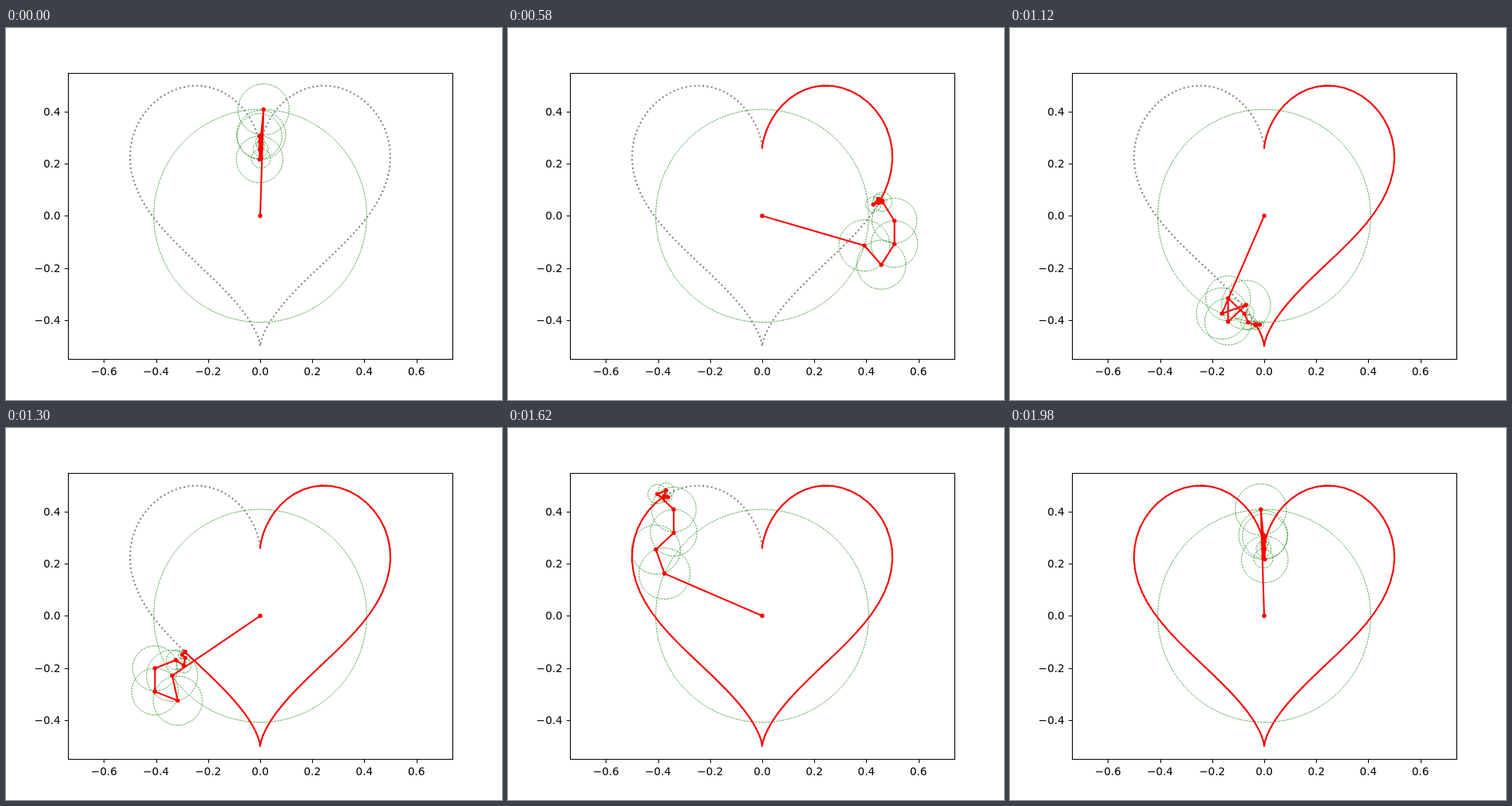
These frames come from a looping animation (640 px wide and 480 px high, 2000 ms). An HTML page:

```html
<!DOCTYPE html>
<html lang="en">
<head>
<meta charset="utf-8">
<title>Heart drawn by epicycles</title>
<style>
  html, body { margin: 0; width: 100%; height: 100%; overflow: hidden; background: #fff; }
  svg { display: block; }
  path { fill: none; }
  text { font: 13.889px "DejaVu Sans", sans-serif; fill: #000; }
  #outline { stroke: #808080; stroke-width: 2.083; stroke-dasharray: 2.083 3.438; stroke-linejoin: round; }
  #circles { stroke: #008000; stroke-width: .694; stroke-dasharray: 2.569 1.111; }
  #trace, #arms { stroke: #f00; stroke-width: 2.083; stroke-linejoin: round; stroke-linecap: square; }
  #joints { stroke: #f00; stroke-width: 5.56; stroke-linecap: round; }
  #axes { stroke: #000; stroke-width: 1.111; }
</style>
</head>
<body>
<svg width="640" height="480" viewBox="0 0 640 480">
  <path id="circles"/>
  <path id="outline"/>
  <path id="trace"/>
  <path id="arms"/>
  <path id="joints"/>
  <path id="axes"/>
  <g id="labels"></g>
</svg>
<script>
const COUNT = 100, STEP = 20, TAU = 2 * Math.PI;
const SCALE = 336, CX = 328, CY = 242.4;
const el = id => document.getElementById(id);
const setPath = (id, d) => el(id).setAttribute('d', d);
const px = x => CX + SCALE * x;
const py = y => CY - SCALE * y;
const at = ([x, y]) => px(x).toFixed(2) + ' ' + py(y).toFixed(2);
const polyline = points => 'M' + points.map(at).join('L');

// Scale values to the range -0.5 to 0.5
function fit(values) {
  const low = Math.min(...values), high = Math.max(...values);
  return values.map(v => (v - low) / (high - low) - 0.5);
}

// Heart samples; the last one repeats the first
const angles = Array.from({ length: COUNT }, (_, i) => TAU * i / (COUNT - 1));
const xs = fit(angles.map(t => Math.sin(t) ** 3));
const ys = fit(angles.map(t =>
  13 * Math.cos(t) - 5 * Math.cos(2 * t) - 2 * Math.cos(3 * t) - Math.cos(4 * t)));
const heart = xs.map((x, i) => [x, ys[i]]);

// Fourier terms, largest radius first
const terms = heart.map((_, i) => {
  const freq = i - COUNT / 2;
  let re = 0, im = 0;
  heart.forEach(([x, y], j) => {
    const a = TAU * freq * j / COUNT, c = Math.cos(a), s = Math.sin(a);
    re += (x * c + y * s) / COUNT;
    im += (y * c - x * s) / COUNT;
  });
  return { freq, radius: Math.hypot(re, im), phase: Math.atan2(im, re) };
}).sort((a, b) => b.radius - a.radius);

function ring([x, y], radius) {
  const r = (radius * SCALE).toFixed(3), d = 2 * r;
  return `M${px(x)} ${py(y) + +r}a${r} ${r} 0 1 0 0 ${-d}a${r} ${r} 0 1 0 0 ${d}`;
}

function draw(step) {
  const joints = [[0, 0]];
  let rings = '';
  for (const { freq, radius, phase } of terms) {
    const [x, y] = joints[joints.length - 1];
    const a = phase + TAU * freq * step / COUNT;
    rings += ring([x, y], radius);
    joints.push([x + radius * Math.cos(a), y + radius * Math.sin(a)]);
  }
  setPath('circles', rings);
  setPath('arms', polyline(joints));
  setPath('joints', joints.map(p => 'M' + at(p) + 'h.001').join(''));
  setPath('trace', step ? polyline(heart.slice(0, step + 1)) : '');
}

function addLabel(value, x, y, anchor) {
  const text = document.createElementNS('http://www.w3.org/2000/svg', 'text');
  text.textContent = value.toFixed(1).replace('-', '\u2212');
  text.setAttribute('x', x);
  text.setAttribute('y', y);
  text.setAttribute('text-anchor', anchor);
  el('labels').append(text);
}

function drawAxes() {
  let d = 'M80.5 58.5H576.5V427.5H80.5Z';
  for (let i = -3; i <= 3; i++) {
    const value = i / 5, x = Math.round(px(value)), y = Math.round(py(value));
    d += `M${x + 0.5} 427.5v4.86`;
    addLabel(value, px(value), 448, 'middle');
    if (Math.abs(i) < 3) {
      d += `M80.5 ${y + 0.5}h-4.86`;
      addLabel(value, 70.3, y + 5, 'end');
    }
  }
  setPath('axes', d);
}

drawAxes();
setPath('outline', polyline(heart));
draw(0);

const start = performance.now();
let shown = 0;
function tick() {
  const step = Math.floor((performance.now() - start) / STEP) % COUNT;
  if (step !== shown) draw(shown = step);
  requestAnimationFrame(tick);
}
requestAnimationFrame(tick);
</script>
</body>
</html>
```
